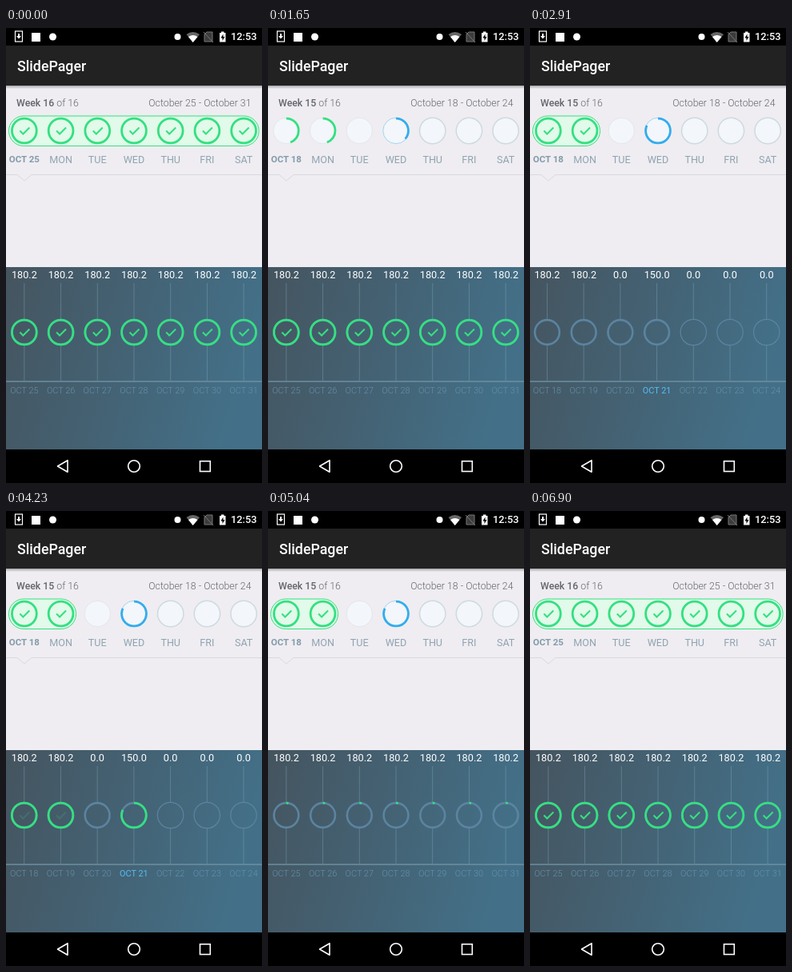
An HTML page for the animation above (7.4 s loop, 320 px wide and 569 px high).

```html
<!DOCTYPE html>
<html lang="en">
<head>
<meta charset="utf-8">
<title>SlidePager</title>
<style>
html, body { margin: 0; width: 100%; height: 100%; overflow: hidden; background: #000; }
svg { display: block; width: 320px; height: 569px; font-family: Roboto, sans-serif; }
.white { fill: #fff; }
.line { fill: none; stroke: #fff; }
.mid { text-anchor: middle; }
.medium { font-weight: 500; }
.head { font-size: 12.3px; font-weight: 300; fill: #63666d; }
.day { font-size: 12.6px; fill: #8fa4b2; }
.first { font-size: 11.5px; font-weight: 700; fill: #839bab; }
.value { font-size: 12.7px; fill: #fff; }
.date { font-size: 10.9px; font-weight: 300; fill: #6592ac; }
.today { fill: #55bdf4; font-weight: 400; }
</style>
</head>
<body>
<svg viewBox="0 0 320 569">
  <defs>
    <linearGradient id="sea" x1="0" y1=".1" x2="1" y2=".3">
      <stop offset="0" stop-color="#455560"/>
      <stop offset=".45" stop-color="#446172"/>
      <stop offset="1" stop-color="#437088"/>
    </linearGradient>
    <linearGradient id="shade" x2="0" y2="1">
      <stop stop-opacity=".3"/>
      <stop offset="1" stop-opacity="0"/>
    </linearGradient>
  </defs>
  <rect y="72" width="320" height="227" fill="#efedf1"/>
  <g id="top"></g>
  <rect y="299" width="320" height="228" fill="url(#sea)"/>
  <path d="M0 442H320" stroke="#6d8fa2" stroke-width="1.6"/>
  <g id="bottom"></g>

  <rect width="320" height="22"/>
  <rect y="22" width="320" height="50" fill="#222"/>
  <rect y="72" width="320" height="4" fill="url(#shade)"/>
  <text x="14" y="53.5" class="white medium" font-size="17.8">SlidePager</text>

  <rect x="11.5" y="4" width="9" height="13" class="line" stroke-width="1.2"/>
  <path d="M15 7h2v3h2l-3 3.5-3-3.5h2z" class="white"/>
  <rect x="32" y="6" width="11" height="11" class="white"/>
  <circle cx="58.500" cy="11" r="4.500" class="white"/>
  <circle cx="214.500" cy="11" r="4" class="white"/>
  <path d="M225.500 8Q233.500 2 242 8L233.700 18z" fill="#666"/>
  <path d="M228 11Q233.700 7 239.500 11L233.700 18z" class="white"/>
  <path d="M251 5h7v12h-10V8zM247 5l12 13" fill="#3c3c3c" stroke="#777"/>
  <path d="M267 6h2V4.500h3.500V6h2v11.500h-7.500z" class="white"/>
  <path d="M271.500 7.500l-3 5h2v3.500l3-5h-2z"/>
  <text x="281" y="15.300" class="white medium" font-size="12.800">12:53</text>

  <rect y="527" width="320" height="42"/>
  <g class="line" stroke-width="1.6">
    <path d="M64.500 548L77 540.700V555.300z" stroke-linejoin="round"/>
    <circle cx="160" cy="548" r="7.300"/>
    <rect x="242.500" y="541.700" width="12.800" height="12.800"/>
  </g>
</svg>
<script>
const LOOP = 7400, W = 320, R = 15.4;
const GREEN = '#34e081', BLUE = '#32adee';
const DAYS = ['', 'MON', 'TUE', 'WED', 'THU', 'FRI', 'SAT'];
// d: done, m: missed, t: today, f: future
const WEEKS = {
  15: { first: 18, days: 'ddmtfff', values: ['180.2', '180.2', '0.0', '150.0', '0.0', '0.0', '0.0'] },
  16: { first: 25, days: 'ddddddd', values: Array(7).fill('180.2') }
};
const GOAL = { d: 1, m: 0, t: 0.82, f: 0 };

const clamp = v => Math.max(0, Math.min(1, v));
const slide = (t, from, to) => 1 - (1 - clamp((t - from) / (to - from)) ** 1.5) ** 4;
const easeInOut = v => v < 0.5 ? 4 * v ** 3 : 1 - 4 * (1 - v) ** 3;
const colX = i => W / 7 * (i + 0.5);

// Ring growth and tick opacity for an animation starting at `start`
const progress = (t, start) => ({
  grow: easeInOut(clamp((t - start - 10) / 730)),
  fade: clamp((t - start - 960) / 180)
});
const FULL = { grow: 1, fade: 1 };

function ring(x, y, color, part, tick) {
  let s = '';
  if (part > 0.001) {
    const dash = part < 1 ? `pathLength="1" stroke-dasharray="${part} 2"` : '';
    s += `<circle r="${R}" transform="translate(${x} ${y}) rotate(-90)" fill="none" stroke="${color}" stroke-width="2.8" ${dash}/>`;
  }
  if (tick > 0)
    s += `<path d="M${x - 5.5} ${y}l4 4 8-8" fill="none" stroke="${color}" stroke-width="2" opacity="${tick}"/>`;
  return s;
}

function topPage(no, x, { grow, fade }) {
  const { first, days } = WEEKS[no], y = 128.5;
  const done = days.lastIndexOf('d');
  let s = `<text x="13" y="98" class="head"><tspan class="medium">Week ${no}</tspan> of 16</text>
    <text x="306.5" y="98" class="head" text-anchor="end">October ${first} - October ${first + 6}</text>
    <path d="M0 183.500H14L23 191L32 183.500H320" fill="none" stroke="#d9dade"/>
    <rect x="3.500" y="110" width="${colX(done) + 19 - 3.5}" height="37.500" rx="18.700" fill="#e1fae9" stroke="${GREEN}" opacity="${fade}"/>`;
  [...days].forEach((kind, i) => {
    const cx = colX(i);
    const [edge, width] = { d: ['#dfe3e8', 0.8], m: ['#dfe3e8', 0.8], t: ['#a4d3f1', 1], f: ['#cddae1', 1.5] }[kind];
    const opacity = kind === 'd' ? 1 - fade : 1;
    s += `<circle cx="${cx}" cy="${y}" r="16.2" fill="#f3f6fa" stroke="${edge}" stroke-width="${width}" opacity="${opacity}"/>`;
    s += ring(cx, y, kind === 't' ? BLUE : GREEN, GOAL[kind] * grow, kind === 'd' ? fade : 0);
    s += i ? `<text x="${cx}" y="168.500" class="mid day">${DAYS[i]}</text>`
           : `<text x="${cx}" y="167.500" class="mid first">OCT ${first}</text>`;
  });
  return `<g transform="translate(${x})">${s}</g>`;
}

function bottomPage(no, x, { grow, fade }) {
  const { first, days, values } = WEEKS[no], y = 380.5;
  let s = '';
  [...days].forEach((kind, i) => {
    const cx = colX(i), future = kind === 'f';
    s += `<path d="M${cx} 319V364M${cx} 397V441" stroke="#86b0c4" stroke-opacity=".38"/>
      <circle cx="${cx}" cy="${y}" r="${future ? 16.2 : R}" fill="none" stroke="#5b84a0" stroke-width="${future ? 1.2 : 2.6}"/>
      <text x="${cx}" y="312.800" class="mid value">${values[i]}</text>
      <text x="${cx}" y="457" class="mid date ${kind === 't' ? 'today' : ''}">OCT ${first + i}</text>`;
    s += ring(cx, y, GREEN, GOAL[kind] * grow, kind === 'd' ? fade : 0);
  });
  return `<g transform="translate(${x})">${s}</g>`;
}

// shift: 0 shows week 16, 1 shows week 15
function pager(page, shift, state15, state16) {
  return (shift > 0 ? page(15, W * (shift - 1), state15) : '') +
         (shift < 1 ? page(16, W * shift, state16) : '');
}

const top_ = document.getElementById('top');
const bottom = document.getElementById('bottom');

function draw(t) {
  top_.innerHTML = pager(topPage,
    slide(t, 530, 1140) - slide(t, 5070, 5460),
    progress(t, 1290), t < 3000 ? FULL : progress(t, 5640));
  bottom.innerHTML = pager(bottomPage,
    slide(t, 2620, 2975) - slide(t, 4230, 4715),
    progress(t, 3240), t < 4000 ? FULL : progress(t, 4890));
}

const begin = performance.now();
function tick() {
  draw((performance.now() - begin) % LOOP);
  requestAnimationFrame(tick);
}
tick();
</script>
</body>
</html>
```
